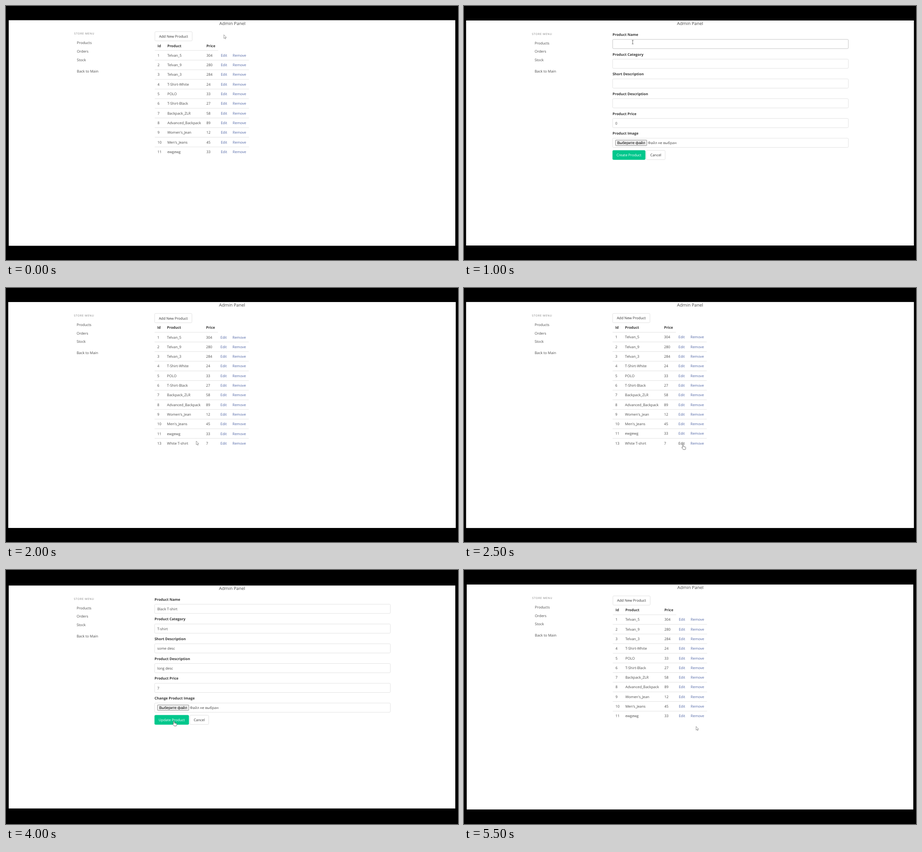
These frames come from a looping animation (998 px wide and 561 px high, 6 s). An HTML page:

```html
<!DOCTYPE html>
<html lang="en">
<head>
<meta charset="utf-8">
<title>Admin Panel</title>
<style>
html, body { margin: 0; width: 100%; height: 100%; overflow: hidden; background: #000; }
svg { display: block; width: 100%; height: 100%; }
text { font: 7.9px "Open Sans", "Noto Sans", sans-serif; fill: #4a4a4a; white-space: pre; text-rendering: geometricPrecision; }
.title { font-size: 9.8px; }
.menu { font-size: 6px; letter-spacing: .72px; fill: #7a7a7a; }
.bold { font-weight: 700; fill: #363636; }
.link { fill: #5267a6; }
.dark { fill: #363636; }
.light { fill: #fff; }
.file { font: 8.3px "Liberation Sans", Arial, sans-serif; fill: #000; }
.mid { text-anchor: middle; }
</style>
</head>
<body>
<svg id="stage" viewBox="0 0 998 561"></svg>
<script>
const stage = document.getElementById('stage');
const STEP = 500, W = 998, H = 561;
const LINE = '#dbdbdb', HOVER = '#b5b5b5', FOCUS = '#485fc7', GREEN = '#00c78c';
const LEFT = 328.2, ROW = 21.3, FIELD = 43.66, BOX = 20.4;
const COL = { id: 334, name: 355.6, price: 441.8, edit: 473.6, remove: 500 };

const products = `Telvan_5 304,Telvan_9 280,Telvan_3 284,T-Shirt-White 24,POLO 33,T-Shirt-Black 27,
  Backpack_ZLR 58,Advanced_Backpack 89,Women's_Jean 12,Men's_Jeans 45,ewgewg 33`
  .split(',').map((s, i) => [i + 1, ...s.trim().split(' ')]);

const text = (x, y, s, cls = '') => `<text x="${x}" y="${y}" class="${cls}">${s}</text>`;
const box = (x, y, w, h, fill = '#fff', stroke = LINE, r = 2) =>
  `<rect x="${x}" y="${y}" width="${w}" height="${h}" rx="${r}" fill="${fill}" stroke="${stroke}" stroke-width=".8"/>`;
const rule = (y, right) => `<path d="M328 ${y}H${right}" stroke="${LINE}" stroke-width=".8"/>`;
const button = (x, y, w, label, fill, stroke, cls = 'dark') =>
  box(x, y, w, BOX, fill, stroke) + text(x + w / 2, y + 13.2, label, 'mid ' + cls);

const sidebar = text(499.2, 41.4, 'Admin Panel', 'title mid') +
  text(150, 63.2, 'STORE MENU', 'menu') +
  ['Products', 'Orders', 'Stock'].map((s, i) => text(156, 84 + 18.75 * i, s)).join('') +
  text(156, 146.3, 'Back to Main');

// extra: name of the added product; hover: 'add', 'edit' or 'remove' (last row)
function table(extra, hover) {
  const rows = extra ? [...products, [13, extra, 7]] : products;
  let out = button(LEFT, 56.4, 82.3, 'Add New Product', '#fff', hover === 'add' ? HOVER : LINE) +
    text(COL.id, 90.3, 'Id', 'bold') + text(COL.name, 90.3, 'Product', 'bold') +
    text(COL.price, 90.3, 'Price', 'bold') + rule(98, 468);
  rows.forEach(([id, name, price], i) => {
    const y = 111.6 + ROW * i, last = i === rows.length - 1;
    const link = key => last && hover === key ? 'dark' : 'link';
    out += text(COL.id, y, id) + text(COL.name, y, name) + text(COL.price, y, price) +
      text(COL.edit, y, 'Edit', link('edit')) + text(COL.remove, y, 'Remove', link('remove'));
    if (!last) out += rule(y + 7.7, 536);
  });
  return out;
}

// state: 'hover' or 'focus' for the first field
function form(values, file, update, state) {
  const labels = ['Product Name', 'Product Category', 'Short Description', 'Product Description',
    'Product Price', update ? 'Change Product Image' : 'Product Image'];
  const edges = { hover: HOVER, focus: FOCUS };
  let out = '';
  labels.forEach((label, i) => {
    const y = 73 + FIELD * i, edge = i === 0 && edges[state] || LINE;
    if (edge === FOCUS)
      out += `<rect x="327.3" y="${y - .9}" width="522.2" height="22.2" rx="2.6" fill="${FOCUS}" opacity=".25"/>`;
    out += text(328, y - 7.8, label, 'bold') + box(LEFT, y, 520.4, BOX, '#fff', edge) +
      text(334, y + 13.6, values[i] || '');
  });
  if (state === 'focus') out += '<path d="M353.5 79v9.6" stroke="#222" stroke-width=".7"/>';
  out += box(334.4, 295.4, 69.2, 12.2, '#efefef', '#767676', 1) +
    text(369, 304.4, 'Выберите файл', 'file mid') + text(406, 304.7, file);
  const w = update ? 75.4 : 72;
  return out + button(LEFT, 318.2, w, update ? 'Update Product' : 'Create Product', GREEN, GREEN, 'light') +
    button(LEFT + w + 2.4, 318.2, 41.6, 'Cancel');
}

const shapes = {
  arrow: 'M0 0v8.2l1.9-1.7 1.3 2.8 1.3-.6-1.3-2.7h2.5z',
  hand: 'M-1.2 1q0-1.2 1.1-1.2t1.1 1.2v3l3.8.7q1.2.3 1.2 1.5v1.4q0 1.6-1 2.9h-4.6l-2.9-3.8q-.6-1 .3-1.3t1 .6z',
  beam: 'M-1.8 0h3.6M0 0v8M-1.8 8h3.6'
};
const cursor = (kind, x, y) =>
  `<path transform="translate(${x} ${y})" d="${shapes[kind]}" fill="#fff" stroke="${kind === 'arrow' ? '#777' : '#444'}" stroke-width=".75" stroke-linejoin="round"/>`;

// The page is centred between black bars; its content follows the top edge.
function view(barX, barY, content, pointer, dx = 0) {
  const dy = .8 * (barY - 31.1);
  return `<rect width="${W}" height="${H}"/>` +
    `<rect x="${barX}" y="${barY}" width="${W - 2 * barX}" height="${H - 2 * barY}" fill="#fff"/>` +
    `<g transform="translate(${dx} ${dy})">${sidebar}${content}</g>` + pointer;
}

const filled = name => [name, 'T-shirt', 'some desc', 'long desc', '7'];
const empty = ['', '', '', '', '0'];
const white = 'White T-shirt', black = 'Black T-shirt', noFile = 'Файл не выбран';

const scenes = [
  view(6, 31.4, table(), cursor('arrow', 481, 63.5), .6),
  view(5.5, 31.4, table('', 'add'), cursor('hand', 371, 68)),
  view(4.6, 32, form(empty, noFile, false, 'hover'), cursor('beam', 372.5, 75.8)),
  view(5, 30.3, form(filled(white), 'tshirt.jpg', false), cursor('hand', 352.7, 331.3)),
  view(5, 31, table(white), cursor('arrow', 420, 338)),
  view(4.6, 30.9, table(white, 'edit'), cursor('hand', 483.6, 346.3)),
  view(5, 31, form(filled(white), noFile, true, 'hover'), cursor('beam', 372.5, 80)),
  view(5, 31, form(filled(black), noFile, true, 'focus'), cursor('arrow', 326.6, 82.3)),
  view(6, 34.3, form(filled(black), noFile, true), cursor('hand', 371, 334)),
  view(6, 34.3, table(black), cursor('beam', 373.2, 337)),
  view(5.8, 32.1, table(black, 'remove'), cursor('hand', 512.5, 346)),
  view(6, 32.1, table(), cursor('arrow', 512.4, 345.5), .6)
];

let shown = -1;
const start = performance.now();
function draw(now) {
  const i = Math.floor(Math.max(0, now - start) / STEP) % scenes.length;
  if (i !== shown) stage.innerHTML = scenes[shown = i];
  requestAnimationFrame(draw);
}
draw(start);
</script>
</body>
</html>
```
